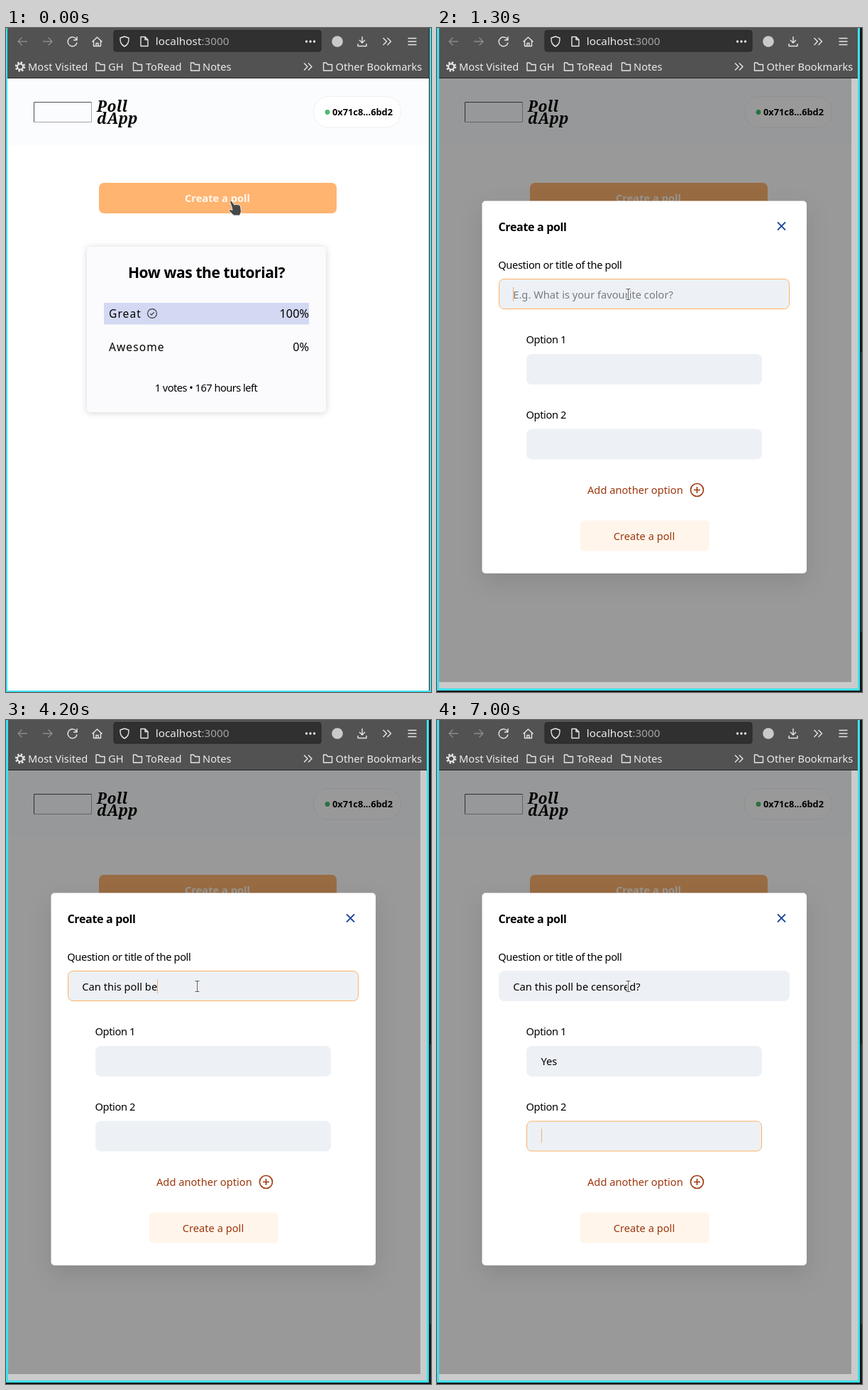
An HTML page that plays this animation: 599x935 px, repeating every 8000 ms.

```html
<!DOCTYPE html>
<html lang="en">
<head>
<meta charset="utf-8">
<title>Poll dApp</title>
<style>
html, body { margin: 0; width: 100%; height: 100%; overflow: hidden; background: #fff; }
svg { display: block; width: 599px; height: 935px; }
text { font: 14.67px "Noto Sans", "Open Sans", sans-serif; white-space: pre; }
.line { fill: none; stroke: #e6e6e6; stroke-width: 1.4; stroke-linejoin: round; }
.off { stroke: #8b8b8b; }
.bar text { fill: #ececec; }
.bar .url { font-size: 15.3px; }
.logo { font: italic 700 21px "Noto Serif", "Liberation Serif", serif; letter-spacing: .5px; }
.wallet { font-size: 12.8px; font-weight: 600; }
.mid { text-anchor: middle; }
.end { text-anchor: end; font-size: 16.3px; }
.bold { font-weight: 700; }
.heading { font-size: 21px; font-weight: 600; letter-spacing: -.4px; }
.choice { font-size: 15.5px; letter-spacing: 1.1px; }
.votes { letter-spacing: -.53px; }
.label { letter-spacing: -.38px; }
.title { font-size: 16px; font-weight: 700; letter-spacing: -.33px; }
.card { fill: #fbfbfe; filter: drop-shadow(0 1px 5px rgba(0, 0, 0, .17)); }
.sheet { fill: #fff; filter: drop-shadow(0 12px 16px rgba(0, 0, 0, .1)); }
.field { fill: #edf1f5; stroke: #edf1f5; }
.field.focus { stroke: #ffb163; }
.rust { fill: #9c360c; }
.plus { stroke: #9c360c; stroke-width: 1.6; }
.edge { fill: #3ee1ee; }
.pointer { fill: #484848; stroke: #eee; stroke-width: 1; stroke-linejoin: round; }
</style>
</head>
<body>
<svg viewBox="0 0 599 935">
  <defs>
    <path id="folder" class="line" d="M-6 -5.5h4l2 2.5h6v8.5h-12z"/>
    <path id="chevrons" class="line" d="M-5.5 -5l5 5l-5 5M.5 -5l5 5l-5 5"/>
  </defs>
  <rect width="599" height="935" fill="#fff"/>

  <g id="page">
    <rect y="71" width="599" height="94" fill="#fbfcfe"/>
    <path d="M39.5 133V104.5H121" fill="none" stroke="#505050"/>
    <path d="M39 132.5H120.5V104" fill="none" stroke="#a8a8a8"/>
    <text class="logo" x="128" y="118">Poll</text>
    <text class="logo" x="128" y="134.5">dApp</text>
    <rect x="433.5" y="96.5" width="123" height="43.500" rx="21" fill="#fff" stroke="#eef0f3"/>
    <circle cx="453" cy="118.500" r="3.400" fill="#48bb6c"/>
    <rect x="131" y="218" width="335" height="43" rx="7" fill="#ffb470"/>
    <text class="mid bold" x="298" y="245" fill="#fff8f0">Create a poll</text>

    <rect class="card" x="114" y="308" width="337" height="233" rx="5"/>
    <text class="heading mid" x="282.500" y="352">How was the tutorial?</text>
    <rect x="138" y="387" width="289" height="30.500" fill="#d3d9f2"/>
    <text class="choice" x="145" y="408">Great</text>
    <g fill="none" stroke="#30323a" stroke-width="1.1">
      <circle cx="206" cy="402" r="6.400"/>
      <path d="M203.200 402.200l2 2l3.600 -4"/>
    </g>
    <text class="end" x="427" y="408">100%</text>
    <text class="choice" x="145" y="455">Awesome</text>
    <text class="end" x="427" y="455">0%</text>
    <text class="votes mid" x="282" y="512">1 votes • 167 hours left</text>
  </g>

  <g id="modal">
    <rect y="71" width="584" height="850" fill="#000" opacity=".4"/>
    <path d="M584 71H596V933H0V921H584z" fill="#cbcbcb"/>
    <rect class="sheet" x="63.500" y="243.500" width="457.500" height="524.500" rx="5"/>
    <text class="title" x="86.500" y="285.500">Create a poll</text>
    <path d="M480 273.500l11 11m0 -11l-11 11" stroke="#2148a0" stroke-width="1.800"/>
    <text class="label" x="86.300" y="338.500">Question or title of the poll</text>
    <rect id="field0" class="field" x="87.500" y="353.500" width="409" height="42" rx="7"/>
    <text id="hint" x="107.300" y="380.500" fill="#777a7e">E.g. What is your favourite color?</text>
    <text id="typed0" x="107.300" y="380.500"></text>
    <text class="label" x="125.500" y="444">Option 1</text>
    <rect id="field1" class="field" x="126.500" y="459.500" width="331" height="42" rx="7"/>
    <text id="typed1" x="146.500" y="486"></text>
    <text class="label" x="125.500" y="550">Option 2</text>
    <rect id="field2" class="field" x="126.500" y="565" width="331" height="42" rx="7"/>
    <text id="typed2" x="146.500" y="591.500"></text>
    <rect id="caret" width="1" height="20" fill="#f2ac74"/>
    <text class="rust" x="212" y="656">Add another option</text>
    <g id="plus" class="plus" fill="none">
      <circle cx="366.500" cy="650.500" r="9"/>
      <path d="M362 650.500h9m-4.500 -4.500v9"/>
    </g>
    <rect x="201.500" y="693.500" width="182.500" height="43" rx="6" fill="#fff5eb"/>
    <text class="rust mid" x="292" y="720.500" font-weight="500" style="font-weight:500">Create a poll</text>
  </g>

  <text class="wallet mid" x="502.500" y="123">0x71c8...6bd2</text>

  <g class="bar">
    <rect width="599" height="71" fill="#525252"/>
    <rect y="70" width="599" height="1" fill="#252525"/>
    <path class="line off" d="M30 19H17m5.500 -5.500l-5.500 5.500l5.500 5.500M52 19h13m-5.500 -5.500l5.500 5.500l-5.500 5.500"/>
    <path class="line" d="M99.500 16.500A6.500 6.500 0 1 0 100 20.500M100 12v5h-5"/>
    <path class="line" d="M121.500 19.500l7 -6.500l7 6.500M123.500 18v7.500h10V18M127 25.500v-4h3v4"/>
    <rect x="152" y="3.500" width="292" height="29.500" rx="3" fill="#303030" stroke="#262626"/>
    <path class="line" d="M167 12l6 2c.5 6 -1 9.500 -6 12c-5 -2.500 -6.500 -6 -6 -12z"/>
    <path class="line" d="M190 12.500h6l4 4v9h-10zM196 12.500v4h4"/>
    <text class="url" x="210.800" y="24.300">localhost<tspan fill="#a3a3a3">:3000</tspan></text>
    <g fill="#e6e6e6">
      <circle cx="423.500" cy="19" r="1.700"/><circle cx="429" cy="19" r="1.700"/><circle cx="434.500" cy="19" r="1.700"/>
    </g>
    <circle cx="467" cy="19" r="7.800" fill="#cacaca"/>
    <path class="line" d="M502 12v9m-4 -4l4 4l4 -4M496 22v3.500h12V22"/>
    <use href="#chevrons" x="537" y="19"/>
    <path class="line" d="M566.500 14.500h12m-12 4.500h12m-12 4.500h12"/>
    <g transform="translate(20 54.500)" fill="none" stroke="#ececec">
      <circle r="4" stroke-width="2"/>
      <circle r="6" stroke-width="2.400" stroke-dasharray="2.356"/>
    </g>
    <text x="31" y="59.800">Most Visited</text>
    <use href="#folder" x="133" y="54.500"/>
    <text x="144" y="59.800">GH</text>
    <use href="#folder" x="185.500" y="54.500"/>
    <text x="197" y="59.800">ToRead</text>
    <use href="#folder" x="266.500" y="54.500"/>
    <text x="277" y="59.800">Notes</text>
    <use href="#chevrons" x="425.500" y="54.500"/>
    <use href="#folder" x="453.500" y="54.500"/>
    <text x="464.500" y="59.800">Other Bookmarks</text>
  </g>

  <g id="thin">
    <rect x="596" width="1" height="933" fill="#202828"/>
    <path class="edge" d="M0 0H2V933H597V0H599V935H0z"/>
  </g>
  <g id="thick">
    <path d="M596 0H599V935H0V933H596z" fill="#14191a"/>
    <rect x="597" y="457" width="2" height="394" fill="#1f3b40"/>
    <path class="edge" d="M0 0H3V930H593V0H596V933H0z"/>
  </g>

  <path id="hand" class="pointer" d="M315.500 244.500c1 -1.500 2.500 -1 3.500 .5l3 4c3 -1 6 -.5 8.500 1.500l1 8l-2 5.500h-8.500l-6.500 -6.500c0 -2 2 -2.500 4.500 -1l-.5 -3z"/>
  <path id="arrow" class="pointer" d="M0 0V19L4.500 15.500L8 18.500L11 13z"/>
  <g id="beam" fill="none">
    <path d="M266.500 367.500h6m-3 0v15m-3 0h6" stroke="#fff" stroke-width="3"/>
    <path d="M266.500 367.500h6m-3 0v15m-3 0h6" stroke="#555"/>
  </g>
</svg>

<script>
const LOOP = 8000;
const el = id => document.getElementById(id);
const show = (id, on) => { el(id).style.display = on ? '' : 'none'; };

// Key press times in tenths of a second, one per character.
const inputs = [
  { text: 'Can this poll be censored?', from: 1300, to: 6000, x: 107, y: 365,
    keys: [21, 22, 23, 24, 26, 26, 29, 29, 30, 32, 34, 35, 37, 37, 38, 42, 44,
           46, 47, 48, 49, 50, 52, 54, 55, 56] },
  { text: 'Yes', from: 6000, to: 7000, x: 146.5, y: 470, keys: [64, 67, 67] },
  { text: '', from: 7000, to: LOOP, x: 146.5, y: 575.5, keys: [] }
];

function drawInput(input, i, t) {
  const count = input.keys.filter(k => k * 100 <= t).length;
  const typed = el('typed' + i);
  const focused = t >= input.from && t < input.to;
  typed.textContent = input.text.slice(0, count);
  el('field' + i).classList.toggle('focus', focused);
  if (!focused) return;
  el('caret').setAttribute('x', Math.round(input.x + typed.getComputedTextLength()));
  el('caret').setAttribute('y', input.y);
}

function draw(t) {
  show('thin', t < 400);
  show('thick', t >= 400);
  show('modal', t >= 600);
  show('plus', t >= 700);
  show('hand', t < 600);
  show('arrow', t >= 600 && t < 1200);
  show('beam', t >= 1200);
  show('caret', t >= 1300);
  show('hint', t < 2100);
  const [x, y] = t < 1000 ? [321.5, 244.5] : t < 1100 ? [308, 285] : [284, 340];
  el('arrow').setAttribute('transform', `translate(${x} ${y})`);
  inputs.forEach((input, i) => drawInput(input, i, t));
}

const start = performance.now();
function tick() {
  draw((performance.now() - start) % LOOP);
  requestAnimationFrame(tick);
}
tick();
</script>
</body>
</html>
```
